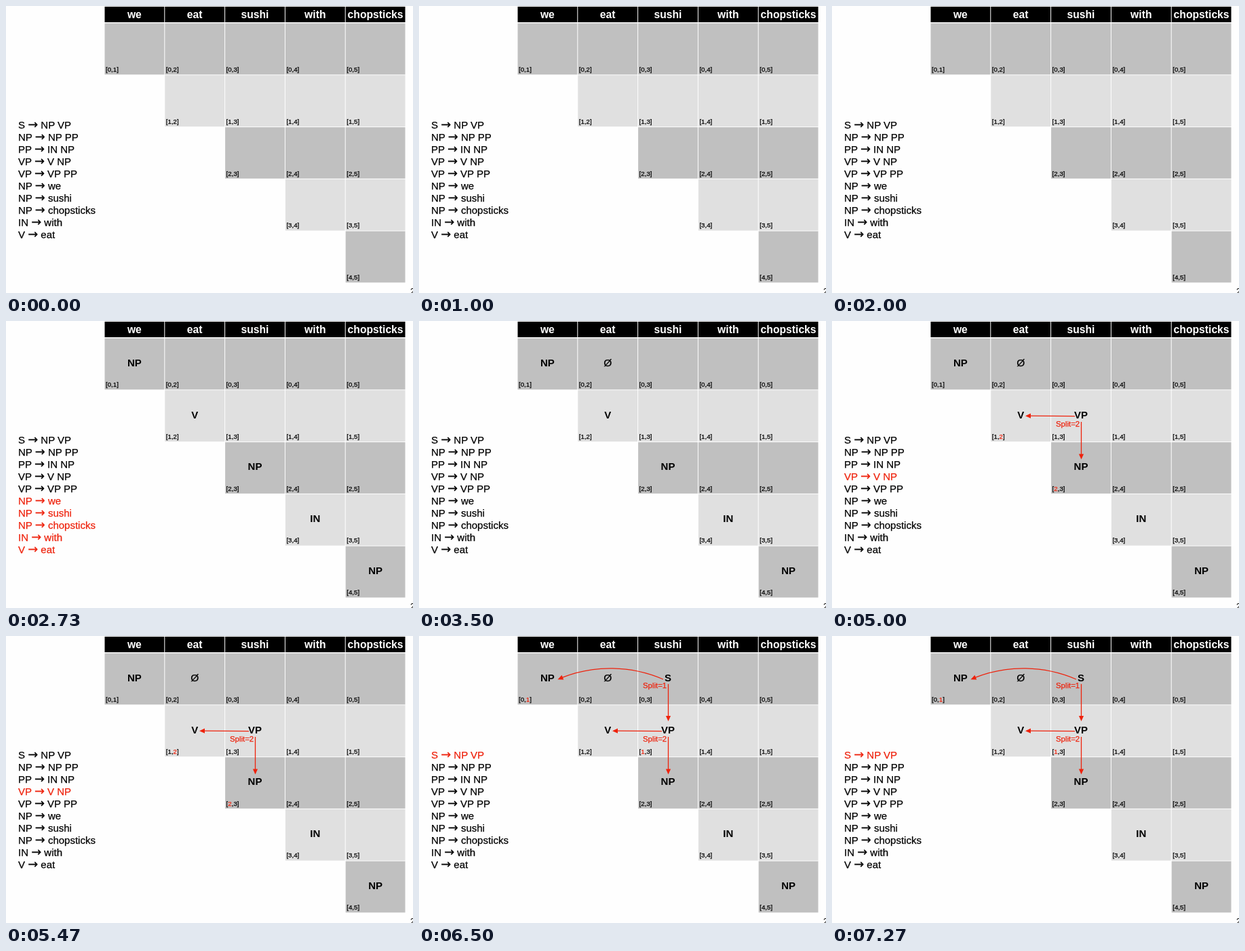
Write an HTML page that moves like this. It is 600 px wide and 424 px high and loops after 8 s.

```html
<!DOCTYPE html>
<html lang="en">
<head>
<meta charset="utf-8">
<title>CKY chart parsing</title>
<style>
html, body { margin: 0; width: 100%; height: 100%; overflow: hidden; background: #fefefe; }
svg { display: block; width: 600px; height: 424px; font-family: "Liberation Sans", Arial, sans-serif; }
text { white-space: pre; fill: currentColor; }
.head { font: bold 15.7px "Liberation Sans", Arial, sans-serif; color: #fff; text-anchor: middle; }
.sym { font: bold 15px "Liberation Sans", Arial, sans-serif; text-anchor: middle; }
.none { font-size: 15.5px; text-anchor: middle; }
.span { font-size: 9.7px; }
.rule { font-size: 15px; }
.to { font: 17.9px "DejaVu Sans", sans-serif; }
.split { font-size: 11.4px; color: #ee220c; }
.rule, .span, .split, .none { stroke: currentColor; stroke-width: 0.25px; }
.line { fill: none; stroke: #ee220c; stroke-width: 1.3; }
.tip { fill: #ee220c; }
</style>
</head>
<body>
<svg id="stage" viewBox="0 0 600 424"></svg>
<script>
const NS = "http://www.w3.org/2000/svg";
const stage = document.getElementById("stage");
const RED = "#ee220c", BLACK = "#000";
const LOOP = 8000;
const CUTS = [2030, 3500, 5000, 6500];   // start of steps 1 to 4
const LEFT = 145, TOP = 25, W = 88.8, H = 76.8;

const words = ["we", "eat", "sushi", "with", "chopsticks"];
const tags = ["NP", "V", "NP", "IN", "NP"];
const rules = ["S → NP VP", "NP → NP PP", "PP → IN NP", "VP → V NP", "VP → VP PP",
  "NP → we", "NP → sushi", "NP → chopsticks", "IN → with", "V → eat"];

const timed = [];    // parts shown from a given step on
const tinted = [];   // parts that are red in one step only

function add(tag, attrs, parent = stage) {
  const el = document.createElementNS(NS, tag);
  for (const key in attrs) el.setAttribute(key, attrs[key]);
  return parent.appendChild(el);
}

function label(str, cls, x, y) {
  const el = add("text", { class: cls, x, y });
  el.textContent = str;
  return el;
}

function from(step, el) { timed.push({ el, step }); return el; }
function tint(step, el) { tinted.push({ el, step }); return el; }

function box(x, y, w, h, fill) {
  add("rect", { x: x + 0.5, y: y + 0.5, width: w - 1, height: h - 1, fill });
}

function piece(str, parent, attrs = {}) {
  const el = add("tspan", attrs, parent);
  el.textContent = str;
  return el;
}

// Step in which one number of a span is highlighted
const hot = { "1,2": [1, 3], "2,3": [0, 3], "0,1": [1, 4], "1,3": [0, 4] };

function spanLabel(i, j, x, y) {
  const el = add("text", { class: "span", x, y });
  const mark = hot[i + "," + j];
  ["[", i, ",", j, "]"].forEach((part, k) => {
    const bit = piece(part, el);
    if (mark && k === 1 + 2 * mark[0]) tint(mark[1], bit);
  });
}

function ruleLabel(rule, x, y) {
  const el = add("text", { class: "rule", x, y });
  const [head, body] = rule.split("→");
  piece(head, el);
  piece("→", el, { class: "to" });
  piece(body, el);
  return el;
}

function arrow(step, path, x, y, angle) {
  const g = from(step, add("g", {}));
  add("path", { class: "line", d: path }, g);
  add("path", { class: "tip", d: "M0,0 L-8,-3.6 L-8,3.6 Z",
    transform: `translate(${x} ${y}) rotate(${angle})` }, g);
}

const midX = col => LEFT + (col + 0.5) * W;
const baseY = row => TOP + row * H + 41.8;

add("rect", { width: 600, height: 424, fill: "#fefefe" });
words.forEach((word, col) => {
  box(LEFT + col * W, 0.5, W, 24, BLACK);
  label(word, "head", midX(col), 18.3);
  for (let row = 0; row <= col; row++) {
    const x = LEFT + col * W, y = TOP + row * H;
    box(x, y, W, H, row % 2 ? "#e0e0e0" : "#c0c0c0");
    spanLabel(row, col + 1, x + 2, y + 72);
  }
  from(1, label(tags[col], "sym", midX(col), baseY(col)));
});

rules.forEach((rule, i) => {
  const el = ruleLabel(rule, 18, 181.4 + 18 * i);
  if (i > 4) tint(1, el);
  if (i === 3) tint(3, el);
  if (i === 0) tint(4, el);
});

from(2, label("Ø", "none", midX(1), baseY(0)));

from(3, label("VP", "sym", midX(2), baseY(1)));
from(3, label("Split=2", "split", 330, 156.3));
arrow(3, "M358,140.6 L292,140.2", 285, 140.2, 180);
arrow(3, "M367.5,149 V197", 367.5, 204.5, 90);

from(4, label("S", "sym", midX(2), baseY(0)));
from(4, label("Split=1", "split", 330, 77.3));
arrow(4, "M360,64 A195,195 0 0 0 211,61.4", 204.5, 64.2, 157);
arrow(4, "M367.5,71 V119", 367.5, 126, 90);

label("2", "page", 596, 426).setAttribute("font-size", 12);

function draw(t) {
  const now = CUTS.filter(cut => t >= cut).length;
  for (const { el, step } of timed) el.setAttribute("visibility", now >= step ? "visible" : "hidden");
  for (const { el, step } of tinted) el.style.color = now === step ? RED : BLACK;
}

function tick() {
  draw(performance.now() % LOOP);
  requestAnimationFrame(tick);
}
draw(0);
tick();
</script>
</body>
</html>
```
